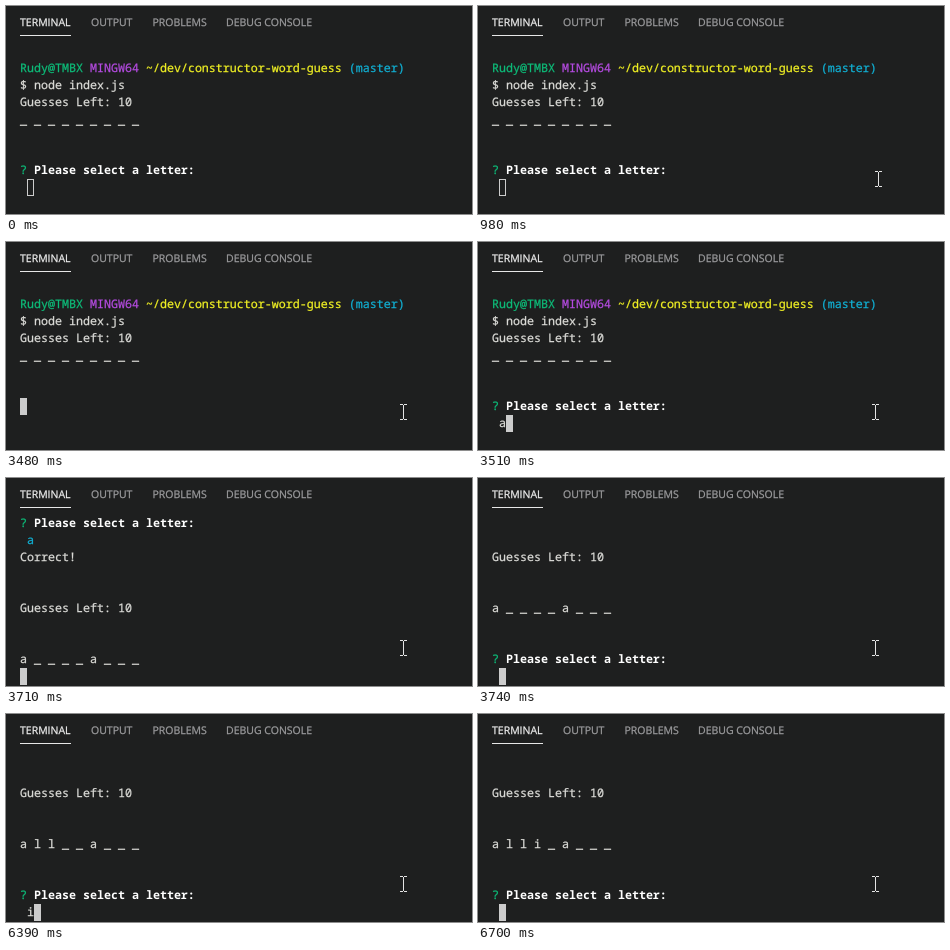
These frames come from a looping animation (466 px wide and 208 px high, 8 s). An HTML page:

```html
<!DOCTYPE html>
<html lang="en">
<head>
<meta charset="utf-8">
<title>Word guess in a terminal</title>
<style>
  html, body { margin: 0; width: 100%; height: 100%; overflow: hidden; background: #1e1f1f; }
  svg { display: block; width: 466px; height: 208px; }
  text {
    white-space: pre; text-rendering: geometricPrecision;
    fill: currentColor; stroke: currentColor; stroke-width: .25px;
  }
  tspan { fill: currentColor; stroke: currentColor; }

  .tabs { font: 10.5px "Open Sans", sans-serif; color: #9c9c9e; }
  .tabs .active { color: #f0f0f0; }
  .tabs rect { fill: #e7e7e7; }
  .term { font: 11.667px "Noto Sans Mono", monospace; color: #dcdcd8; }
  .green { color: #0dbc79; }
  .purple { color: #b44be0; }
  .yellow { color: #f2f224; }
  .cyan { color: #11b0d4; }
  .bold { color: #fff; font-weight: 700; stroke-width: 0; }

  /* Every change is a hard cut on one shared 8 s clock. */
  .t { animation: 8s step-end infinite; }
  .intro { animation-name: intro; }
  .ask { animation-name: ask; }
  .type-a { animation-name: type-a; }
  .result { animation-name: result; }
  .round { animation-name: round; }
  .word-1 { animation-name: word-1; }
  .word-2 { animation-name: word-2; }
  .word-3 { animation-name: word-3; }
  .type-l { animation-name: type-l; }
  .type-i { animation-name: type-i; }
  .cursor { animation-name: cursor, focus; stroke: #ccc; }
  .mouse { animation-name: mouse; stroke: #e4e4e4; fill: none; }
  .cursor, .mouse { shape-rendering: crispEdges; }

  @keyframes intro { 0% { opacity: 1 } 46.375%, 100% { opacity: 0 } }
  @keyframes ask { 0%, 43.875% { opacity: 1 } 43.5%, 46.375%, 100% { opacity: 0 } }
  @keyframes type-a { 0%, 46.375%, 100% { opacity: 0 } 43.875% { opacity: 1 } }
  @keyframes result { 0%, 46.75%, 100% { opacity: 0 } 46.375% { opacity: 1 } }
  @keyframes round { 0% { opacity: 0 } 46.75%, 100% { opacity: 1 } }
  @keyframes word-1 { 0% { opacity: 1 } 64.25%, 100% { opacity: 0 } }
  @keyframes word-2 { 0%, 83.75%, 100% { opacity: 0 } 64.25% { opacity: 1 } }
  @keyframes word-3 { 0% { opacity: 0 } 83.75%, 100% { opacity: 1 } }
  @keyframes type-l { 0%, 64.25%, 100% { opacity: 0 } 58.5% { opacity: 1 } }
  @keyframes type-i { 0%, 83.75%, 100% { opacity: 0 } 79.875% { opacity: 1 } }

  @keyframes cursor {
    0% { transform: translate(21px, 173px) }
    43.5% { transform: translate(14px, 156px) }
    43.875% { transform: translate(28px, 173px) }
    46.375% { transform: translate(14px, 190px) }
    46.75%, 64.25%, 83.75%, 100% { transform: translate(21px, 190px) }
    58.5%, 79.875% { transform: translate(28px, 190px) }
  }
  @keyframes focus { 0% { fill: transparent } 14.5%, 100% { fill: #ccc } }
  @keyframes mouse {
    0% { transform: translate(403px, 220px) }
    9.75% { transform: translate(403px, 194px) }
    10.5% { transform: translate(402px, 173px) }
    11.25% { transform: translate(399px, 161px) }
    12.25% { transform: translate(397px, 165px) }
    13.25% { transform: translate(398px, 165px) }
    13.75%, 14.5% { transform: translate(397px, 165px) }
    16.75% { transform: translate(396px, 164px) }
    17.25% { transform: translate(395px, 163px) }
    17.75%, 100% { transform: translate(394px, 162px) }
  }
</style>
</head>
<body>
<svg viewBox="0 0 466 208">
  <g class="tabs">
    <text class="active" x="14" y="20">TERMINAL</text>
    <text x="85" y="20">OUTPUT</text>
    <text x="146.5" y="20">PROBLEMS</text>
    <text x="220" y="20">DEBUG CONSOLE</text>
    <rect x="14" y="29" width="51" height="1"/>
  </g>

  <g class="term">
    <g class="t intro">
      <text x="14" y="66"><tspan class="green">Rudy@TMBX</tspan> <tspan class="purple">MINGW64</tspan> <tspan class="yellow">~/dev/constructor-word-guess</tspan> <tspan class="cyan">(master)</tspan></text>
      <text x="14" y="83">$ node index.js</text>
      <text x="14" y="100">Guesses Left: 10</text>
      <text x="14" y="117.5">_ _ _ _ _ _ _ _ _</text>
    </g>
    <text class="t ask" x="14" y="168"><tspan class="green">?</tspan> <tspan class="bold">Please select a letter:</tspan></text>
    <text class="t type-a" x="21" y="185">a</text>

    <g class="t result">
      <text x="14" y="49"><tspan class="green">?</tspan> <tspan class="bold">Please select a letter:</tspan></text>
      <text class="cyan" x="21" y="66">a</text>
      <text x="14" y="83">Correct!</text>
      <text x="14" y="134">Guesses Left: 10</text>
      <text x="14" y="185">a _ _ _ _ a _ _ _</text>
    </g>

    <g class="t round">
      <text x="14" y="83">Guesses Left: 10</text>
      <text class="t word-1" x="14" y="134">a _ _ _ _ a _ _ _</text>
      <text class="t word-2" x="14" y="134">a l l _ _ a _ _ _</text>
      <text class="t word-3" x="14" y="134">a l l i _ a _ _ _</text>
      <text x="14" y="185"><tspan class="green">?</tspan> <tspan class="bold">Please select a letter:</tspan></text>
      <text class="t type-l" x="21" y="202">l</text>
      <text class="t type-i" x="21" y="202">i</text>
    </g>
  </g>

  <rect class="t cursor" x=".5" y=".5" width="6" height="16"/>
  <path class="t mouse" d="M0 .5h3m1 0h3M3.5 1v14M0 15.5h3m1 0h3"/>
</svg>
</body>
</html>
```
